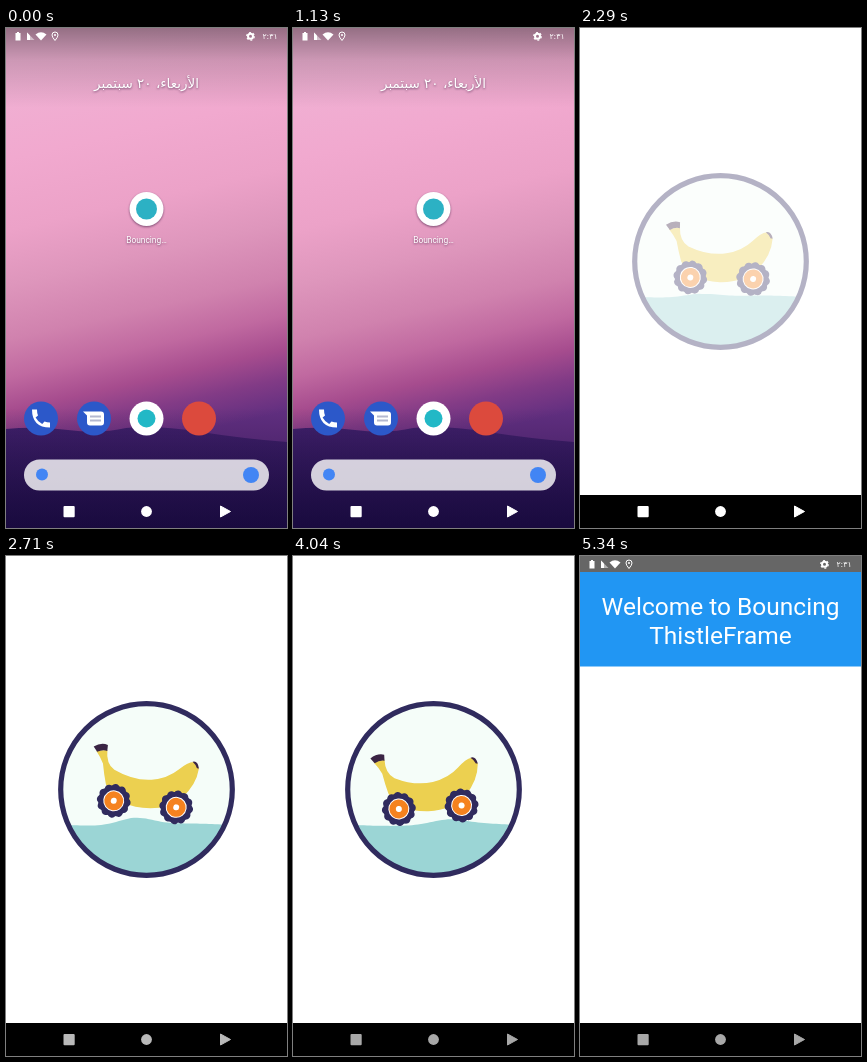
Recreate the animation shown at these times as an HTML page. Size 281x500 px, loop 5500 ms.

```html
<!DOCTYPE html>
<html lang="en">
<head>
<meta charset="utf-8">
<title>App launch</title>
<style>
  html, body { margin: 0; width: 100%; height: 100%; overflow: hidden; background: #fff; }
  svg { display: block; width: 100vw; height: 100vh; }
  text { text-anchor: middle; fill: #fff; }
  .latin { font-family: Roboto, Arial, sans-serif; }
  .arabic { font-family: "DejaVu Sans", sans-serif; direction: rtl; }
  .shade { filter: drop-shadow(0 1px 1px rgba(40, 10, 50, .55)); }
</style>
</head>
<body>
<svg viewBox="0 0 281 500" preserveAspectRatio="none">
  <defs>
    <linearGradient id="sky" gradientUnits="userSpaceOnUse" x1="95" y1="5" x2="185" y2="405">
      <stop offset="0" stop-color="#f0b3d5"/>
      <stop offset=".25" stop-color="#f1a9cf"/>
      <stop offset=".42" stop-color="#eca2c8"/>
      <stop offset=".55" stop-color="#de96bc"/>
      <stop offset=".68" stop-color="#d082ae"/>
      <stop offset=".77" stop-color="#c069a0"/>
      <stop offset=".85" stop-color="#a64c8e"/>
      <stop offset=".92" stop-color="#823b86"/>
      <stop offset="1" stop-color="#612f80"/>
    </linearGradient>
    <linearGradient id="hill" x1="0" y1="0" x2="0" y2="1">
      <stop offset="0" stop-color="#40206a"/>
      <stop offset="1" stop-color="#2c1454"/>
    </linearGradient>
    <linearGradient id="topShade" x1="0" y1="0" x2="0" y2="1">
      <stop offset="0" stop-color="#000" stop-opacity=".38"/>
      <stop offset=".4" stop-color="#000" stop-opacity=".15"/>
      <stop offset="1" stop-color="#000" stop-opacity="0"/>
    </linearGradient>
    <linearGradient id="lowShade" x1="0" y1="0" x2="0" y2="1">
      <stop offset="0" stop-color="#0c0430" stop-opacity="0"/>
      <stop offset="1" stop-color="#0c0430" stop-opacity=".6"/>
    </linearGradient>
    <clipPath id="porthole"><circle cx="140.5" cy="233.5" r="86"/></clipPath>
    <g id="wheel"></g>
  </defs>

  <g id="home">
    <rect width="281" height="500" fill="url(#sky)"/>
    <path d="M0 401Q30 398 62 402T120 400Q150 397 195 404T281 414V500H0Z" fill="url(#hill)"/>
    <g id="scrim">
      <rect width="281" height="80" fill="url(#topShade)"/>
      <rect y="380" width="281" height="120" fill="url(#lowShade)"/>
    </g>
    <g id="launcher" class="shade">
      <circle cx="140.5" cy="181" r="17" fill="#fff"/>
      <circle cx="140.5" cy="181" r="10.5" fill="#2cb1c4"/>
      <text class="latin" x="140.5" y="215" font-size="8.4">Bouncing…</text>
    </g>
    <g id="shift">
      <text class="arabic shade" x="140.5" y="59.5" font-size="13.5">الأربعاء، ٢٠ سبتمبر</text>
      <g id="dock">
        <circle cx="35" cy="390.5" r="17" fill="#2c58c9"/>
        <path transform="translate(23 378.5)" fill="#fff" d="M3 3H8Q8 7 9 9L6.6 11Q9 15.5 13.2 17.4L15.5 15Q18 16 21 16V21Q3 21 3 3Z"/>
        <circle cx="88" cy="390.5" r="17" fill="#2c58c9"/>
        <path d="M77 383.5H95Q98 383.5 98 386.5V394.5Q98 397.5 95 397.5H84Q81 397.5 81 394.5V387.5Z" fill="#fff"/>
        <path d="M84 388.5H95M84 392.5H95" stroke="#b4b8cf" stroke-width="1.8"/>
        <circle cx="140.5" cy="390.5" r="17" fill="#fff"/>
        <circle cx="140.5" cy="390.5" r="9" fill="#22b8c6"/>
        <circle cx="193" cy="390.5" r="17" fill="#dc4a3d"/>
      </g>
      <g id="search">
        <rect x="18" y="431.5" width="245" height="31" rx="15.5" fill="#fff" opacity=".8"/>
        <circle cx="36" cy="446.5" r="6" fill="#4285f4"/>
        <circle cx="245" cy="447" r="8" fill="#4285f4"/>
      </g>
    </g>
  </g>

  <rect id="window" fill="#fff"/>

  <g id="splash">
    <g clip-path="url(#porthole)">
      <rect x="50" y="143" width="181" height="181" fill="#f5fdf9"/>
      <path id="water" fill="#9bd5d5"/>
      <g id="car">
        <path fill="#ecd050" d="M-54 -48L-43 -50Q-43 -36 -34 -31Q-14 -22 4 -25Q20 -28 30 -38Q38 -46 44 -47L50 -41Q49 -24 36 -10Q22 4 -2 4Q-32 3 -41 -16Q-44 -26 -46 -36Q-49 -42 -54 -48Z"/>
        <path fill="#3a2444" d="M-57 -52Q-50 -57 -43 -55L-43 -49Q-48 -50 -53 -47ZM43 -47Q48 -49 50 -41L48 -41Q46 -45 43 -47Z"/>
        <use class="wheel" href="#wheel"/>
        <use class="wheel" href="#wheel"/>
      </g>
    </g>
    <circle cx="140.5" cy="233.5" r="85.8" fill="none" stroke="#302b5e" stroke-width="5.2"/>
  </g>

  <g id="welcome">
    <rect width="281" height="500" fill="#fff"/>
    <rect width="281" height="16.5" fill="#666"/>
    <rect y="16" width="281" height="94.5" fill="#2196f3"/>
    <g class="latin" font-size="24.5">
      <text x="140.5" y="59">Welcome to Bouncing</text>
      <text x="140.5" y="87.5">ThistleFrame</text>
    </g>
  </g>

  <rect id="bar" y="467" width="281" height="33"/>
  <g id="nav" fill="#fff">
    <rect x="57.5" y="478" width="11.2" height="11.2" rx="1"/>
    <circle cx="140.5" cy="483.5" r="5.4"/>
    <path d="M214.5 478L224.5 483.5L214.5 489Z" stroke="#fff" stroke-linejoin="round"/>
  </g>

  <g id="status" fill="#fff">
    <path d="M9.5 5H11V4H13V5H14.5V12.5H9.5Z"/>
    <path d="M21 4.5V12H28.5Z" opacity=".5"/>
    <path d="M21 4.5V12H24V7.5Z"/>
    <path d="M29.5 6.5Q35 2 40.5 6.5L35 12.5Z"/>
    <path d="M49 4Q52 4 52 7Q52 9 49 12.5Q46 9 46 7Q46 4 49 4Z" fill="none" stroke="#fff"/>
    <circle cx="49" cy="7" r="1"/>
    <circle cx="244.5" cy="8.3" r="2.5" fill="none" stroke="#fff" stroke-width="2"/>
    <circle cx="244.5" cy="8.3" r="3.8" fill="none" stroke="#fff" stroke-width="1.2" stroke-dasharray="2 1.98"/>
    <text class="arabic" x="264" y="11" font-size="7.8">٢:٣١</text>
  </g>
</svg>

<script>
const LOOP = 5500;
const $ = id => document.getElementById(id);
const set = (el, attrs) => { for (const k in attrs) el.setAttribute(k, attrs[k]); };
const smooth = p => p * p * (3 - 2 * p);
const linear = p => p;
const decel = p => 1 - (1 - p) ** 3;

// Rows are [time, ...values]; returns the values at t.
function track(rows, t, ease = smooth) {
  const i = rows.findIndex(r => r[0] > t);
  if (i === 0) return rows[0].slice(1);
  if (i < 0) return rows[rows.length - 1].slice(1);
  const a = rows[i - 1], b = rows[i];
  const p = ease((t - a[0]) / (b[0] - a[0]));
  return a.slice(1).map((v, k) => v + (b[k + 1] - v) * p);
}
const ramp = (t, from, to, ease = linear) => track([[from, 0], [to, 1]], t, ease)[0];

// x, y, width, height, opacity
const WINDOW = [
  [1690, 123, 164, 35, 35, 0],
  [1750, 32.5, 187.5, 90.5, 92.5, .42],
  [1835, 32.5, 187.5, 90.5, 92.5, .42],
  [2060, 0, 0, 281, 500, 1]
];
// car x, car y, tilt, wave crest x, wave height
const RIDE = [
  [2150, 141.7, 250.2, 1.4, 122, 4],
  [2330, 141.7, 250.2, 1.4, 122, 4],
  [2560, 140, 250.5, -3, 152, 5],
  [2800, 138.5, 247, 10, 120, 9],
  [3000, 138, 250.5, -2, 152, 5],
  [3210, 137.5, 246.5, 12, 118, 10],
  [3280, 137.5, 246.5, 12, 118, 10],
  [3620, 138, 250.8, -3, 155, 5],
  [3830, 137.5, 247.5, 9, 120, 9],
  [4040, 137.2, 251.2, -3.2, 155, 5],
  [4120, 137.2, 251.2, -3.2, 155, 5],
  [4400, 137.5, 247, 10, 120, 9]
];

function buildWheel() {
  const dot = (r, fill, cx = 0, cy = 0) => `<circle cx="${cx}" cy="${cy}" r="${r}" fill="${fill}"/>`;
  let parts = dot(15.5, '#302b5e');
  for (let i = 0; i < 12; i++) {
    const a = i * Math.PI / 6;
    parts += dot(4.2, '#302b5e', 12.8 * Math.cos(a), 12.8 * Math.sin(a));
  }
  $('wheel').innerHTML = parts + dot(10.5, '#fff') + dot(9.5, '#f5821f') + dot(3, '#fff');
}

function waterPath(crest, height) {
  let d = 'M50 324';
  for (let x = 50; x <= 232; x += 3) {
    const bump = height * Math.exp(-(((x - crest) / 24) ** 2));
    const y = 269 - bump + 1.5 * Math.sin((x - 60) / 26) * (x < crest ? .6 : 1);
    d += `L${x} ${y.toFixed(2)}`;
  }
  return d + 'V324Z';
}

function drawHome(t) {
  const leave = ramp(t, 1690, 1750);
  const rest = ramp(t, 1835, 2000);
  set($('home'), { visibility: t < 2100 ? 'visible' : 'hidden' });
  set($('scrim'), { opacity: 1 - leave });
  set($('launcher'), { opacity: 1 - leave });
  set($('shift'), { transform: `translate(0 ${18 * leave + 18 * rest})`, opacity: 1 - rest });
  set($('dock'), { opacity: 1 - .2 * leave });
  set($('search'), { opacity: 1 - .35 * leave });
  const [x, y, width, height, opacity] = track(WINDOW, t);
  set($('window'), { x, y, width, height, opacity });
}

function drawSplash(t) {
  const [x, y, tilt, crest, height] = track(RIDE, t);
  set($('splash'), { opacity: ramp(t, 2180, 2490) });
  set($('car'), { transform: `translate(${x} ${y}) rotate(${tilt})` });
  set($('water'), { d: waterPath(crest, height) });
  document.querySelectorAll('.wheel').forEach((w, i) =>
    set(w, { transform: `translate(${i ? 31.4 : -31.4} 0) rotate(${t * .2})` }));
}

function drawWelcome(t) {
  const slide = 37 * (1 - ramp(t, 4270, 4620, decel));
  set($('welcome'), { transform: `translate(0 ${slide})`, opacity: ramp(t, 4270, 4470) });
}

function render(t) {
  drawHome(t);
  drawSplash(t);
  drawWelcome(t);
  set($('bar'), { opacity: ramp(t, 1900, 2060) });
  set($('nav'), { opacity: 1 - .34 * ramp(t, 2330, 2800) });
}

buildWheel();
const start = performance.now();
function tick() {
  render((performance.now() - start) % LOOP);
  requestAnimationFrame(tick);
}
tick();
</script>
</body>
</html>
```
